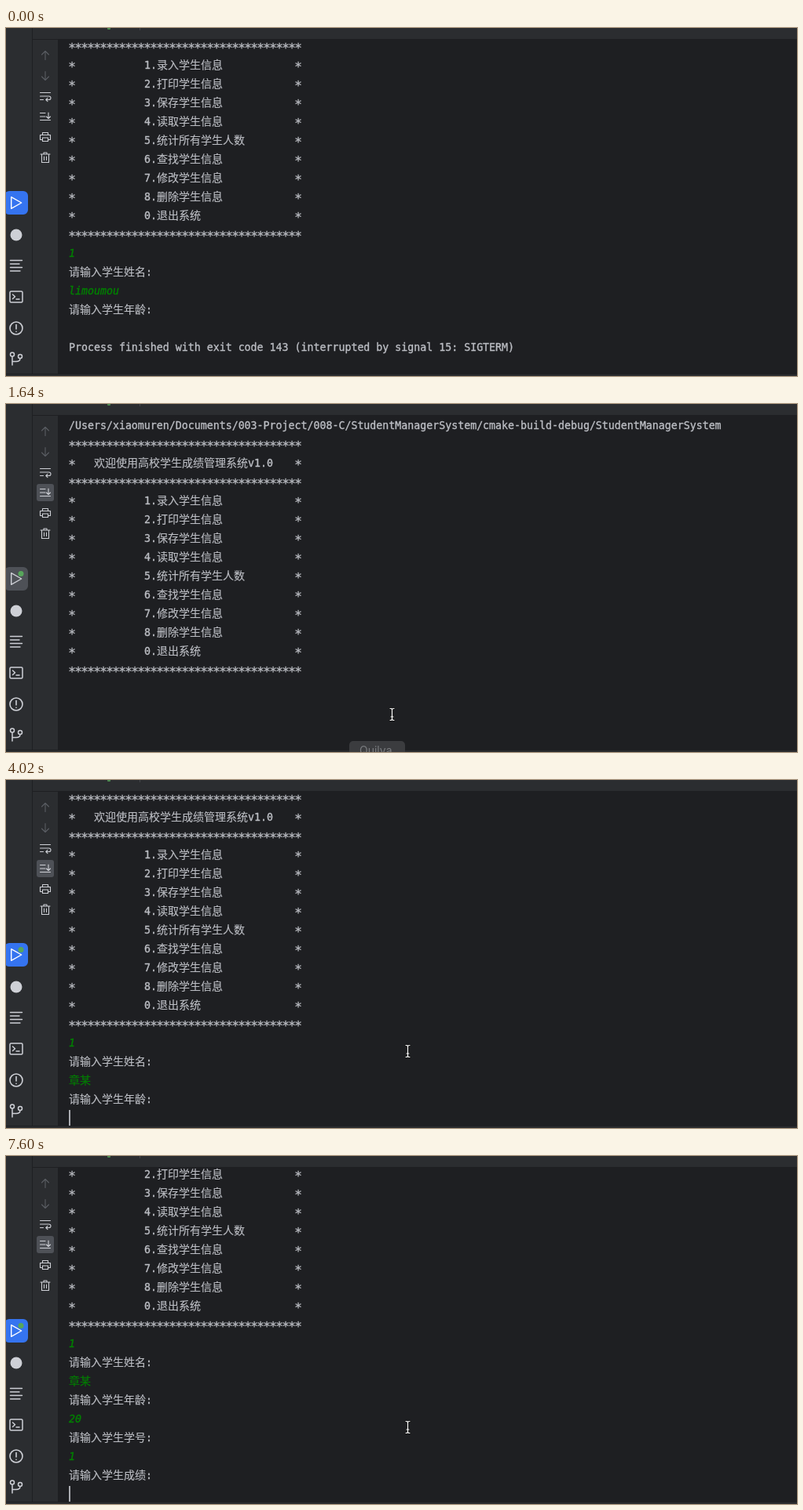
Animation of 1007x444 px, one loop 8000 ms. Source, as an HTML page with a canvas:

```html
<!DOCTYPE html>
<html lang="zh-CN">
<head>
<meta charset="utf-8">
<style>
  html, body { margin: 0; width: 100%; height: 100%; overflow: hidden; background: #1e1f22; }
  canvas { display: block; }
</style>
</head>
<body>
<canvas id="stage" width="1007" height="444"></canvas>
<script>
const ctx = document.getElementById('stage').getContext('2d');
const LOOP = 8000, LEFT = 80, ROW = 24;
const PANEL = '#2b2d30', BACK = '#1e1f22', TEXT = '#bcbec4', ICON = '#ced0d6',
      DIM = '#5a5d63', INPUT = '#008000', SELECTED = '#4e5157', BLUE = '#3574f0';
const MONO = 'px "DejaVu Sans Mono", monospace';
const HAN = 'px "Noto Sans CJK SC", "Noto Sans CJK", sans-serif';

// Lines starting with "#" are framed menu rows, with ">" typed input.
const STARS = '*'.repeat(37);
const MENU = [
  '/Users/xiaomuren/Documents/003-Project/008-C/StudentManagerSystem/cmake-build-debug/StudentManagerSystem',
  STARS, '#欢迎使用高校学生成绩管理系统v1.0', STARS,
  '#1.录入学生信息', '#2.打印学生信息', '#3.保存学生信息', '#4.读取学生信息', '#5.统计所有学生人数',
  '#6.查找学生信息', '#7.修改学生信息', '#8.删除学生信息', '#0.退出系统', STARS
];
const FIRST_RUN = [...MENU, '>1', '请输入学生姓名:', '>limoumou', '请输入学生年龄:', '',
  'Process finished with exit code 143 (interrupted by signal 15: SIGTERM)'];
const SECOND_RUN = [...MENU, '>1', '请输入学生姓名:', '>章某', '请输入学生年龄:', '>20',
  '请输入学生学号:', '>1', '请输入学生成绩:'];
const BUILD = [
  '='.repeat(20) + '[ Build | StudentManagerSystem | Debug ]' + '='.repeat(20),
  '/Applications/CLion.app/Contents/bin/cmake/mac/bin/cmake --build /Users/xiaomuren/Documents/003-Project/008-C/StudentManagerSystem',
  'ninja: no work to do.'
];

// Time, finished lines, text being typed (null: no caret).
const TYPING = [
  [1050, 14, null], [2240, 14, '1'], [2540, 16, ''], [3720, 16, '章某'], [4020, 18, ''],
  [4620, 18, '2'], [4920, 18, '20'], [5070, 20, ''], [5810, 20, '1'], [5960, 22, ''],
  [6860, 22, null], [7150, 22, '9'], [7600, 22, '']
];
const CANDIDATES = [
  [2840, '在 这 中 做 再 最 着 只'], [2990, '这 中 只 着 找 之 种 者'], [3140, '站 战 占 展 沾 粘 盏 斩'],
  [3270, '张 长 涨 ^ 章 账 帐 胀'], [3420, '章某 长 张 涨 章'], [3570, '章某 张 章'], [3720, '']
];

const at = (list, t) => list.filter(s => s[0] <= t).pop();

function box(x, y, w, h, color, r = 0) {
  ctx.fillStyle = color;
  ctx.beginPath();
  ctx.roundRect(x, y, w, h, r);
  ctx.fill();
}

function dot(x, y, r, color) {
  ctx.fillStyle = color;
  ctx.beginPath();
  ctx.arc(x, y, r, 0, 7);
  ctx.fill();
}

function icon(path, x, y, color = ICON, width = 1.3) {
  ctx.save();
  ctx.translate(x, y);
  ctx.strokeStyle = color;
  ctx.lineWidth = width;
  ctx.lineJoin = ctx.lineCap = 'round';
  ctx.stroke(new Path2D(path));
  ctx.restore();
}

const isHan = s => /[\u4e00-\u9fff]/.test(s);

// Fills with a hairline outline for a medium weight.
function ink(str, x, y, font, weight) {
  ctx.font = font;
  ctx.lineWidth = weight;
  ctx.lineJoin = 'round';
  ctx.fillText(str, x, y);
  ctx.strokeText(str, x, y);
}

// Large asterisks, tightened to the 8 px column grid.
function stars(run, x, y) {
  ctx.letterSpacing = '-1.633px';
  ink(run, x - .8, y + 7.6, 16 + MONO, .3);
  ctx.letterSpacing = '0px';
}

// Draws mixed text centred on y and returns where it ends.
function write(str, x, y, color = TEXT, style = '') {
  ctx.fillStyle = ctx.strokeStyle = color;
  for (const run of str.match(/[\u4e00-\u9fff]+|\*+|[^\u4e00-\u9fff*]+/g) || []) {
    const han = isHan(run);
    if (run[0] === '*') stars(run, x, y);
    else if (han) ink(run, x, y + 5, 14 + HAN, .15);
    else ink(run, x, y + 5, style + 13.288 + MONO, .35);
    x += run.length * (han ? 14 : 8);
  }
  return x;
}

function line(str, y) {
  if (str[0] === '#') {
    write('*', LEFT, y);
    write(str.slice(1), isHan(str[1]) ? 112 : 176, y);
    write('*', 368, y);
  } else if (str[0] === '>') write(str.slice(1), LEFT, y, INPUT, 'italic ');
  else write(str, LEFT, y);
}

function terminal(lines, typed) {
  const scroll = Math.max(0, lines.length * ROW - 404);
  const rowY = i => 27 + i * ROW - scroll;
  lines.forEach((s, i) => line(s, rowY(i)));
  if (typed === null) return;
  const y = rowY(lines.length);
  box(write(typed, LEFT, y, INPUT, 'italic ') + .2, y - 10, 1.6, 20, ICON);
}

function buildOutput() {
  box(67, 87, 940, 24, '#2a2c30');
  BUILD.forEach((s, i) => line(s, 27 + i * ROW));
  box(82, 434, 940, 7, '#55575a', 3.5);
}

function sideBar(mode, t) {
  const build = mode === 'build', focused = t < 750 || t >= 1940;
  if (build) box(-2, 288, 30, 30, SELECTED, 6);
  else box(-2, 208, 30, 30, focused ? BLUE : SELECTED, 6);
  icon('M-6-7.3L7 0L-6 7.3Z', 12.7, 223, focused ? '#fff' : ICON, 1.4);
  if (mode !== 'done') {
    dot(19, 216.5, 4.5, build ? PANEL : focused ? BLUE : SELECTED);
    dot(19, 216.5, 3.5, '#57a65b');
  }
  dot(13, 264, 7.5, ICON);
  icon('M-7.5-6.5H7.5M-7.5-2H4M-7.5 2.5H7.5M-7.5 7H5', 13, 303, ICON, 1.4);
  icon('M-8-5.5Q-8-7-6.5-7H6.5Q8-7 8-5.5V5.5Q8 7 6.5 7H-6.5Q-8 7-8 5.5ZM-4.5-3L-1.5-.3L-4.5 2.5M0 3H4', 13, 343, ICON, 1.5);
  icon('M8 0A8 8 0 1 1-8 0A8 8 0 1 1 8 0M0-4.5V1M0 4.2V4.4', 13, 383, ICON, 1.6);
  icon('M-2.5-5.5A2.5 2.5 0 1 1-7.5-5.5A2.5 2.5 0 1 1-2.5-5.5M7.5-3A2.5 2.5 0 1 1 2.5-3A2.5 2.5 0 1 1 7.5-3M-5-3V8M5-.5Q5 3.5 0 3.5H-5', 13, 422, ICON, 1.5);
}

function toolBar(mode) {
  let y = 35;
  if (mode === 'build') {
    box(44, 29, 12, 12, '#66686d', 2);
    box(40, 51, 20, 1, '#43454a');
    y += 33;
  }
  if (mode !== 'done') box(39, y + 67, 22, 22, SELECTED, 3);
  icon('M0 5.5V-5.5M-4.5-1L0-5.5L4.5-1', 50, y, DIM, 1.1);
  icon('M0-5.5V5.5M-4.5 1L0 5.5L4.5 1', 50, y + 26, DIM, 1.1);
  icon('M-6.5-4.5H6.5M-6.5 0H4.5Q7 0 7 2.2Q7 4.5 4.5 4.5H1M3 2.3L.8 4.5L3 6.7M-6.5 4.5H-2.5', 50, y + 52, ICON, 1.1);
  icon('M-6.5-4.5H0M-6.5 0H0M-6.5 4.5H6.5M4-5V2.5M1.5 0L4 2.5L6.5 0', 50, y + 78, ICON, 1.1);
  icon('M-3.5-2.5V-5.5H3.5V-2.5M-3.5 3.5H-6.5V-2.5H6.5V3.5H3.5M-3.5 1H3.5V5.5H-3.5Z', 50, y + 104, ICON, 1.1);
  icon('M-6-4H6M-2-4V-6H2V-4M-4.5-4V6.5H4.5V-4M-1.5-1V3.5M1.5-1V3.5', 50, y + 130, ICON, 1.1);
}

function header(mode) {
  box(34, 0, 973, 14, PANEL);
  if (mode === 'build') {
    box(88, -3, 7, 5, ICON, 2);
    box(127, 12, 74, 3, DIM, 1.5);
  } else {
    box(129, -2, 4, 4, '#4d8a50', 1);
    box(170, 0, 1, 3, '#43454a');
  }
}

function candidates(list) {
  const words = list.split(' ');
  box(80, 431, words.length * 46 + 80, 40, '#fff', 7);
  box(83, 434, 24 + words[0].length * 16, 30, '#12b27c', 5);
  let x = 88;
  words.forEach((word, i) => {
    ctx.font = 11 + HAN;
    ctx.fillStyle = i ? '#888' : '#fff';
    ctx.fillText(i + 1, x, 449);
    if (word === '^') {
      box(x + 12, 437, 16, 16, '#e6e9ec', 1);
      icon('M-6 5L-2 0L1 2L7-7', x + 20, 445, '#d33b3b', 2);
    } else {
      ctx.font = 16 + HAN;
      ctx.fillStyle = i ? '#333' : '#fff';
      ctx.fillText(word, x + 12, 451);
    }
    x += 30 + word.length * 16;
  });
}

function tooltip() {
  box(437, 430, 71, 30, '#3b3c3f', 5);
  ctx.font = '14px Inter, sans-serif';
  ctx.fillStyle = '#7a7c7f';
  ctx.fillText('Quilva', 450, 447);
}

function pointer(t) {
  const step = t < 1640 ? 0 : t < 1790 ? 1 : 2;
  const x = 471 + step * 20, y = 446 - step * 50;
  const beam = 'M-2.5-7.5Q0-7.5 0-6Q0-7.5 2.5-7.5M0-6V6M-2.5 7.5Q0 7.5 0 6Q0 7.5 2.5 7.5M-1.5 3H1.5';
  icon(beam, x + .5, y, '#111', 2.6);
  icon(beam, x + .5, y, '#fff', 1.2);
}

function draw(t) {
  const mode = t < 750 ? 'done' : t < 1050 ? 'build' : 'run';
  box(0, 0, 1007, 444, BACK);

  ctx.save();
  ctx.beginPath();
  ctx.rect(67, 14, 940, 427);
  ctx.clip();
  if (mode === 'done') terminal(FIRST_RUN, null);
  else if (mode === 'build') buildOutput();
  else {
    const [, count, typed] = at(TYPING, t);
    terminal(SECOND_RUN.slice(0, count), typed);
  }
  ctx.restore();

  box(0, 0, 33, 441, PANEL);
  box(34, 15, 32, 426, PANEL);
  box(0, 442, 1007, 2, PANEL);
  header(mode);
  sideBar(mode, t);
  toolBar(mode);

  const words = at(CANDIDATES, t);
  if (words && words[1]) candidates(words[1]);
  if (t >= 1490 && t < 1790) tooltip();
  if (t >= 1490) pointer(t);
}

const start = performance.now();
function tick() {
  draw((performance.now() - start) % LOOP);
  requestAnimationFrame(tick);
}
tick();
</script>
</body>
</html>
```
